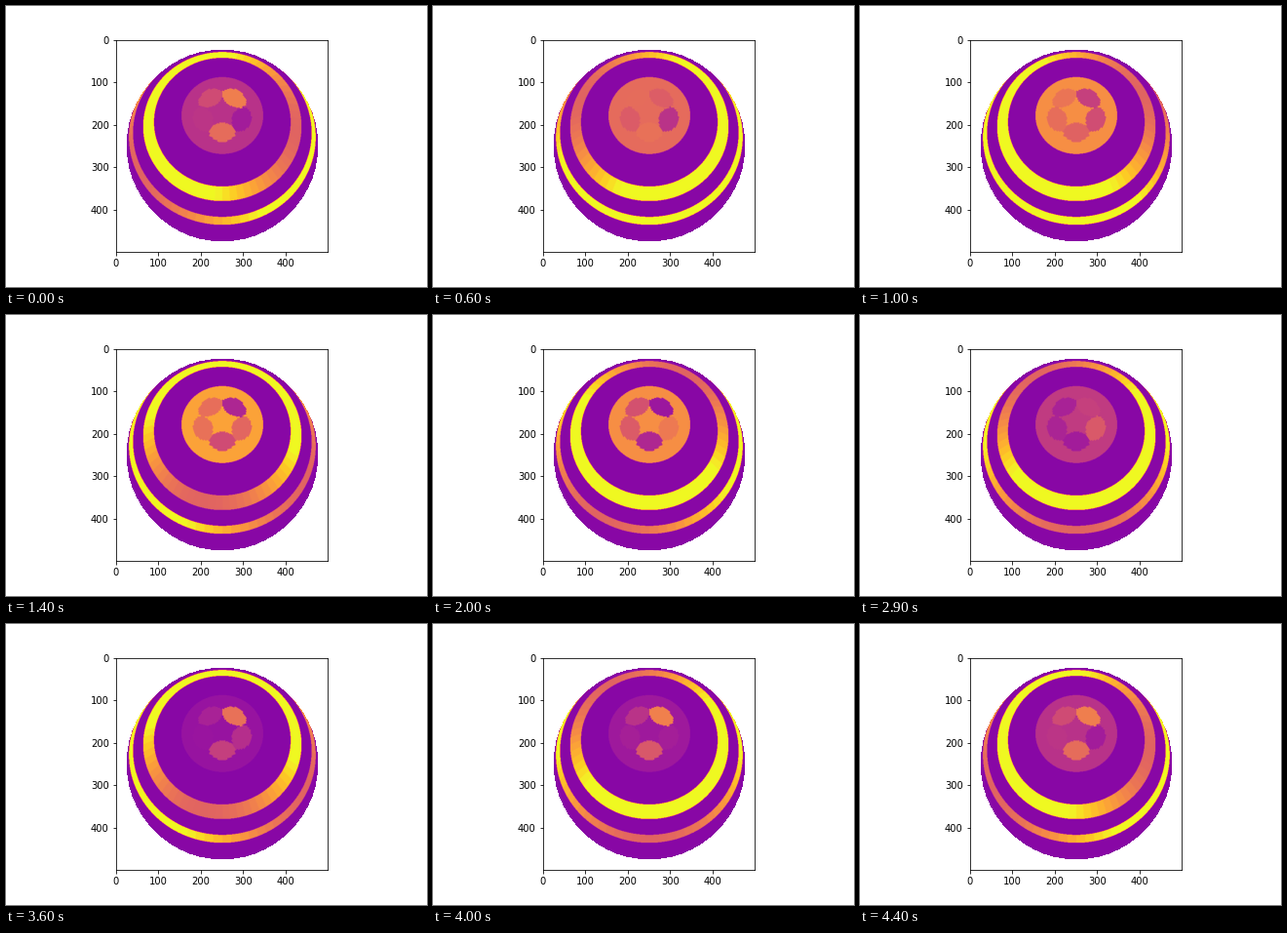
A matplotlib script that plays this animation: 432x288 px, repeating every 4.5 s.

```python
import numpy as np
import matplotlib.pyplot as plt
from matplotlib.animation import FuncAnimation

SIZE, RADIUS, TILT = 500, 227.5, np.radians(20)
FRAMES, CYCLE = 45, 44
BASE = 0.28

plt.rcParams.update({"font.family": "DejaVu Sans", "font.size": 10})


def swing(t, mean, amp, peak):
    return mean + amp * np.cos(2 * np.pi * (t - peak) / CYCLE)


def snap(a, step):
    return (np.floor(a / step) + 0.5) * step


# Orthographic view of a sphere with its pole tipped towards the viewer
row, col = np.mgrid[:SIZE, :SIZE]
mid = (SIZE - 1) / 2
x, y = (col - mid) / RADIUS, (mid - row) / RADIUS
rr = x**2 + y**2
z = np.sqrt(np.clip(1 - rr, 0, None))
up = np.clip(y * np.sin(TILT) + z * np.cos(TILT), -1, 1)
colat = np.degrees(np.arccos(up))
lon = np.degrees(np.arctan2(x, z * np.sin(TILT) - y * np.cos(TILT)))
disc = rr <= 1


def band(lo, hi):
    return disc & (colat >= lo) & (colat < hi)


# (mask, longitude of the dimmest point, turns per cycle)
bands = [
    (band(45, 55), 84, -4),
    (band(67.5, 75), -65, 20),
    (band(105, 112.5), 84, -4),
]
cap = band(0, 25)
block_lon = snap(lon, 5.625)
cell_lon, cell_lat = snap(lon, 5), snap(colat, 0.9)


def spot(center):
    d = (cell_lon - center + 180) % 360 - 180
    return disc & ((d / 37) ** 2 + ((cell_lat - 12) / 5.8) ** 2 < 1)


# (mask, mean, amplitude, time of peak)
spots = [
    (spot(0), 0.495, 0.155, 4),
    (spot(72), 0.51, 0.16, 20.5),
    (spot(144), 0.515, 0.18, 41.5),
    (spot(-144), 0.505, 0.15, 10.5),
    (spot(-72), 0.485, 0.16, 13),
]


def render(t):
    img = np.full((SIZE, SIZE), BASE)
    for mask, start, turns in bands:
        dim = start + 360 * turns * t / CYCLE
        wave = 1 - 0.4 * np.cos(np.radians(block_lon[mask] - dim))
        img[mask] = np.minimum(wave, 1)
    img[cap] = swing(t, 0.555, 0.235, 15)
    for mask, *cycle in spots:
        img[mask] = swing(t, *cycle)
    return np.ma.array(img, mask=~disc)


fig, ax = plt.subplots(figsize=(6, 4), dpi=72)
fig.subplots_adjust(left=0.125, right=0.9, bottom=0.125, top=0.88)
im = ax.imshow(render(0), cmap="plasma", vmin=0, vmax=1)
ax.set_xticks(range(0, 500, 100))
ax.set_yticks(range(0, 500, 100))


def update(t):
    im.set_data(render(t))
    return [im]


anim = FuncAnimation(fig, update, frames=FRAMES, interval=100,
                     repeat=True, repeat_delay=0)
plt.show()
```
